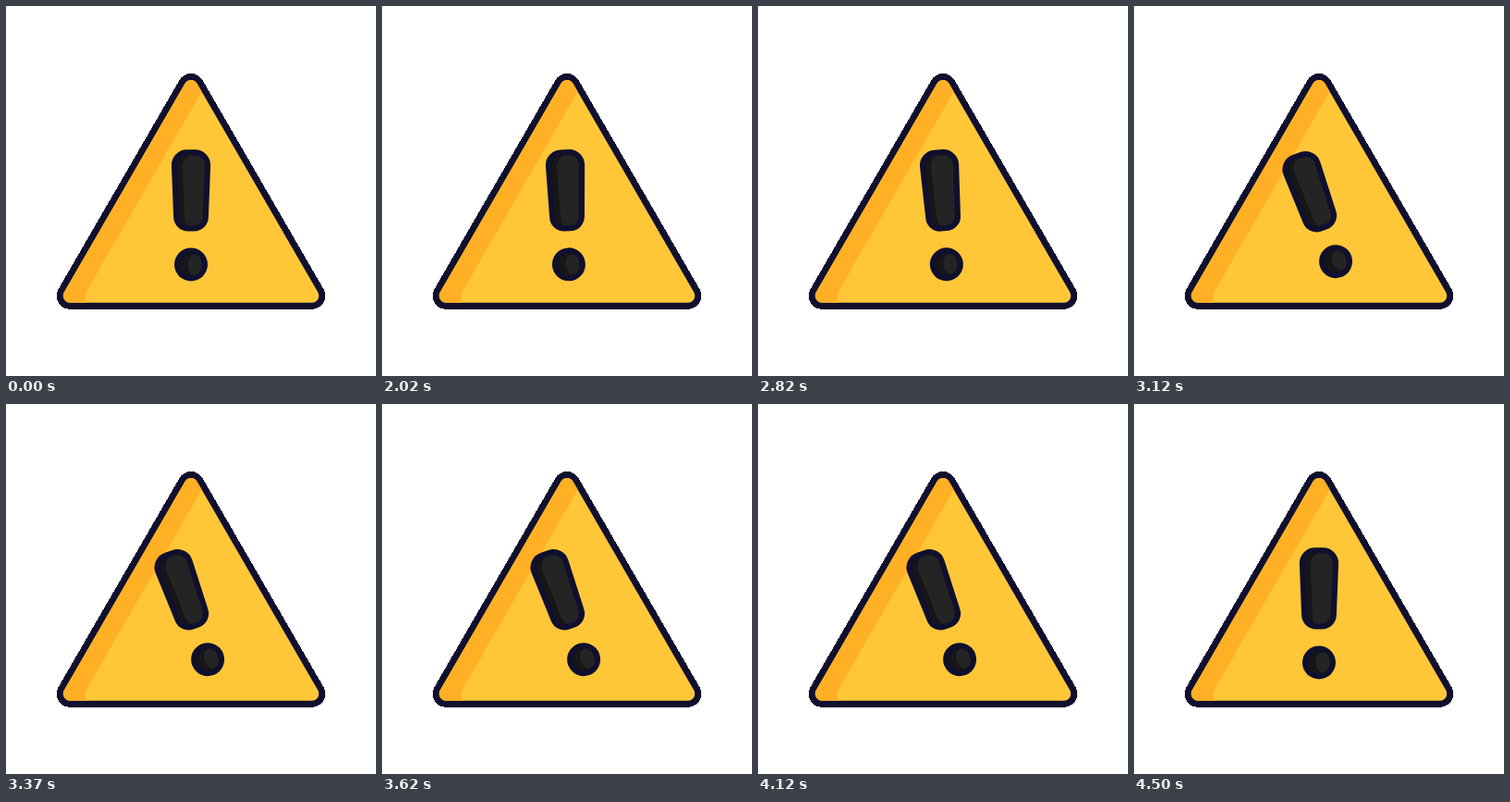
Write an HTML page that moves like this. It is 400 px wide and 400 px high and loops after 4.52 s.

```html
<!DOCTYPE html>
<html lang="en">
<head>
<meta charset="utf-8">
<title>Warning sign</title>
<style>
  html, body { margin: 0; width: 100%; height: 100%; overflow: hidden; background: #fff; }
  svg { display: block; width: 100%; height: 100%; }
</style>
</head>
<body>
<svg viewBox="0 0 400 400">
  <defs>
    <path id="triangle" d="M200 87.5 L330.75 313.25 H69.25 Z" stroke-linejoin="round"/>
    <path id="bar" d="M195.5 158.3 H204.5 A13.7 13.7 0 0 1 218 172.5 L215.8 228 A12.5 12.5 0 0 1 203.3 240.3
      H196.7 A12.5 12.5 0 0 1 184.2 228 L182 172.5 A13.7 13.7 0 0 1 195.5 158.3 Z"/>
    <clipPath id="shade"><path d="M0 0 H265.1 L89.6 304 Q83 313 87.5 322 V400 H0 Z"/></clipPath>
  </defs>

  <use href="#triangle" fill="#10102e" stroke="#10102e" stroke-width="29" shape-rendering="crispEdges"/>
  <use href="#triangle" fill="#ffc738" stroke="#ffc738" stroke-width="15"/>
  <g clip-path="url(#shade)">
    <use href="#triangle" fill="#ffb024" stroke="#ffb024" stroke-width="15"/>
  </g>

  <g id="mark">
    <use href="#bar" fill="#161616"/>
    <path d="M204.5 160 C196 160 190.5 167 190.8 175 L193 229 C193.5 236 197 240 203.3 240.3
      A12.5 12.5 0 0 0 215.8 228 L218 172.5 A13.7 13.7 0 0 0 204.5 158.3 Z" fill="#242424"/>
    <use href="#bar" fill="none" stroke="#10102e" stroke-width="6.2"/>
    <circle cx="200" cy="279.4" r="18" fill="#10102e"/>
    <circle cx="200" cy="279.4" r="11.7" fill="#161616"/>
    <ellipse cx="204" cy="279.4" rx="7.6" ry="11" fill="#242424"/>
  </g>
</svg>
<script>
  const LOOP = 4520, TICK = 25, START = 80, SWING = 5, SWINGS = 20;
  const LEFT = -20, RIGHT = 25;
  const mark = document.getElementById('mark');

  const smooth = x => x * x * (3 - 2 * x);

  // Angle at the end of each swing: rest, left, right, left, ... rest
  function pose(k) {
    if (k <= 0 || k >= SWINGS) return 0;
    return k % 2 ? LEFT : RIGHT;
  }

  function angleAt(ms) {
    const tick = Math.floor((Math.floor(ms / 10) * 10 + 5) / TICK);
    const swing = Math.max(0, tick - START) / SWING;
    const k = Math.floor(swing);
    return pose(k) + (pose(k + 1) - pose(k)) * smooth(swing - k);
  }

  function draw() {
    mark.setAttribute('transform', `rotate(${angleAt(performance.now() % LOOP)} 200 226.5)`);
    requestAnimationFrame(draw);
  }
  draw();
</script>
</body>
</html>
```
